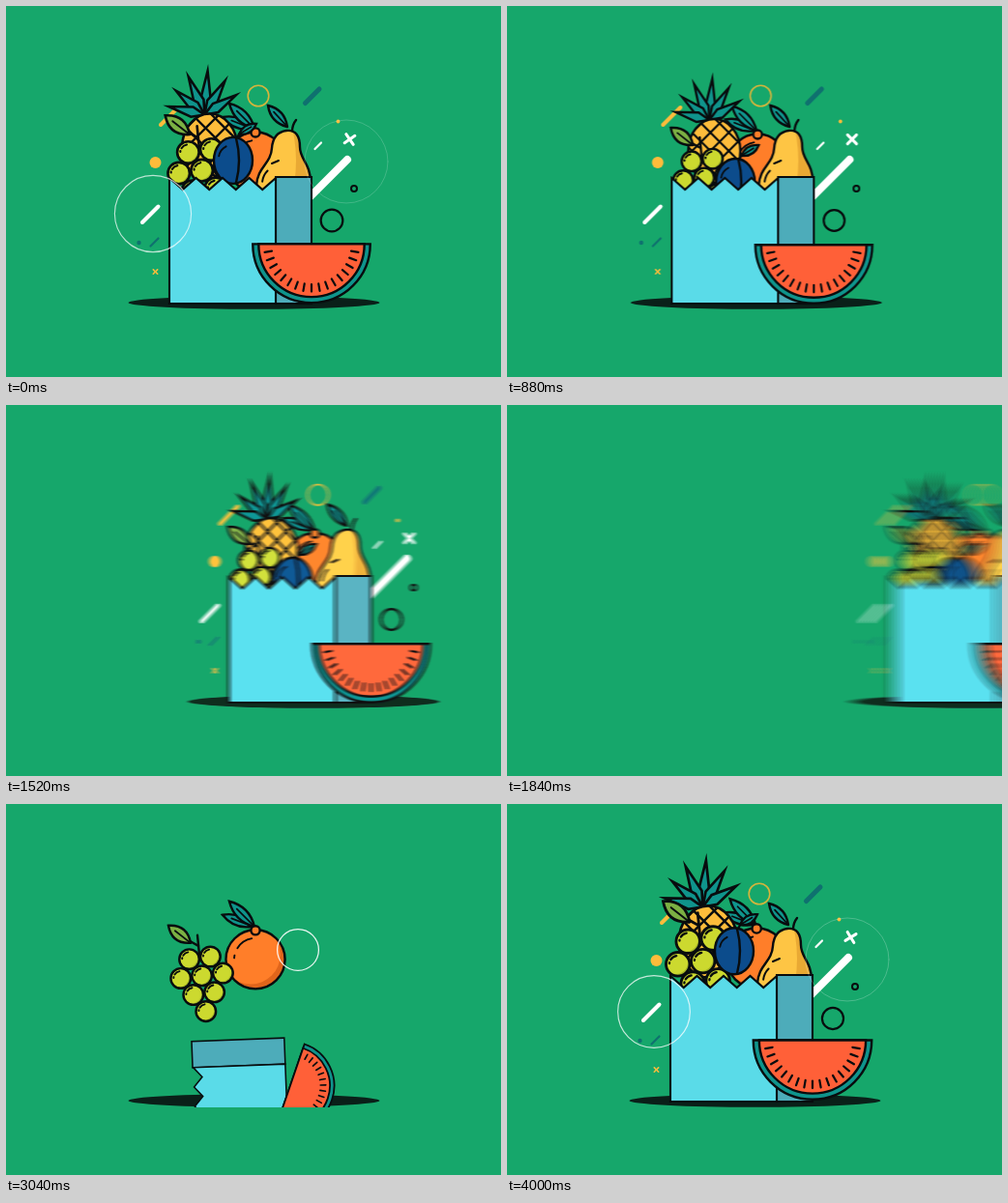
Write an HTML page with a canvas that moves like this. It is 512x384 px and loops after 4.04 s.

```html
<!DOCTYPE html>
<html lang="en">
<head>
<meta charset="utf-8">
<title>Fruit bag</title>
<style>
html, body { margin: 0; width: 100%; height: 100%; overflow: hidden; background: #16a76b; }
canvas { display: block; width: 512px; height: 384px; }
</style>
</head>
<body>
<canvas id="stage" width="512" height="384"></canvas>
<script>
const LOOP = 4040, TAU = Math.PI * 2, RAD = Math.PI / 180;
const BG = '#16a76b', INK = '#080c0e', TEAL = '#0f948c', GOLD = '#fdbc3b', DEEP = '#0f716f', WHITE = '#fff';

function surface(canvas) {
  canvas.width = 512;
  canvas.height = 384;
  return canvas.getContext('2d');
}
const out = surface(document.getElementById('stage'));
const trail = surface(document.createElement('canvas'));
const c = surface(document.createElement('canvas'));

// Timing
const span = (t, start, length) => Math.min(1, Math.max(0, (t - start) / length));
const mix = (a, b, u) => a + (b - a) * u;
const easeOut = u => 1 - (1 - u) ** 3;
const easeBoth = u => u < .5 ? 8 * u ** 4 : 1 - 8 * (1 - u) ** 4;
const backOut = u => 1 + 2.7 * (u - 1) ** 3 + 1.7 * (u - 1) ** 2;
const arrive = (t, start, length) => easeOut(span(t, start, length));
const settle = (t, late) => easeBoth(span(t, 3735 + late, 520));
const swell = (t, start, length, peak, rest = 1, late = 0) =>
  mix(peak * arrive(t, start, length), rest, settle(t, late));
const slide = t => t < 800 ? 0 : 3.65 * (Math.exp(.004 * (t - 800)) - 1);

// Drawing helpers
function place(x, y, deg, s, ox, oy, draw) {
  if (s < .01) return;
  c.save();
  c.translate(x, y);
  c.rotate(deg * RAD);
  c.scale(s, s);
  c.translate(-ox, -oy);
  draw();
  c.restore();
}
const grow = (s, ox, oy, draw) => place(ox, oy, 0, s, ox, oy, draw);

function paint(fill, lw = 2.4, ink = INK) {
  if (fill) { c.fillStyle = fill; c.fill(); }
  if (lw) { c.lineWidth = lw; c.strokeStyle = ink; c.stroke(); }
}
function oval(x, y, rx, ry, fill, lw, ink) {
  c.beginPath();
  c.ellipse(x, y, rx, ry, 0, 0, TAU);
  paint(fill, lw, ink);
}
const disc = (x, y, r, fill, lw, ink) => oval(x, y, r, r, fill, lw, ink);
function poly(points, fill, lw) {
  c.beginPath();
  points.forEach(p => c.lineTo(...p));
  c.closePath();
  paint(fill, lw);
}
function line(x1, y1, x2, y2, lw, ink) {
  c.beginPath();
  c.moveTo(x1, y1);
  c.lineTo(x2, y2);
  paint(null, lw, ink);
}
function bow(x1, y1, mx, my, x2, y2, lw) {
  c.beginPath();
  c.moveTo(x1, y1);
  c.quadraticCurveTo(mx, my, x2, y2);
  paint(null, lw);
}
function arc(x, y, r, from, to, lw) {
  c.beginPath();
  c.arc(x, y, r, from * RAD, to * RAD);
  paint(null, lw);
}
function clipped(shape, draw) {
  c.save();
  shape();
  c.clip();
  draw();
  c.restore();
}
function leaf(x1, y1, x2, y2, w, fill) {
  const mx = (x1 + x2) / 2, my = (y1 + y2) / 2, d = Math.hypot(x2 - x1, y2 - y1);
  const nx = (y1 - y2) / d * w, ny = (x2 - x1) / d * w;
  c.beginPath();
  c.moveTo(x1, y1);
  c.quadraticCurveTo(mx + nx, my + ny, x2, y2);
  c.quadraticCurveTo(mx - nx, my - ny, x1, y1);
  paint(fill);
  line(x1, y1, mix(x1, x2, .7), mix(y1, y2, .7), 1.7);
}
// Round fruit, shaded lower right, with a broken highlight stroke
function ball(x, y, r, fill, shade) {
  clipped(() => disc(x, y, r, shade, 0), () => disc(x - r * .16, y - r * .16, r, fill, 0));
  disc(x, y, r, null);
  arc(x, y, r * .72, 212, 260, 1.9);
  arc(x, y, r * .72, 184, 191, 1.9);
}

// Fruit
function orange() {
  leaf(255, 127, 224, 115, 10, TEAL);
  leaf(257, 127, 231, 101, 11, TEAL);
  ball(258, 161, 30.5, '#ff7e29', '#e0651b');
  disc(258, 131, 4.6, '#ff7e29');
}

function pineapple() {
  for (const i of [3, 2, 4, 1, 5, 0]) {
    const deg = -77 + 27 * i;
    const length = 36 + 7 * Math.cos(deg * RAD) ** 6;
    place(208, 118, deg, 1, 0, 0, () =>
      poly([[0, 0], [-5, -length * .35], [0, -length], [5, -length * .35]], TEAL));
  }
  const body = (fill, lw) => oval(213, 150, 27, 33, fill, lw);
  clipped(() => body(GOLD, 0), () => {
    for (let x = 133; x < 300; x += 19) {
      line(x - 40, 110, x + 40, 190, 2.2);
      line(x + 40, 110, x - 40, 190, 2.2);
    }
  });
  body(null);
}

function grapes() {
  line(198, 136, 200, 156);
  bow(199, 147, 195, 145, 190, 142);
  leaf(191, 144, 168, 126, 13, '#7bb043');
  [2, 3, 2, 1].forEach((count, row) => {
    for (let i = 0; i < count; i++) {
      const k = i - (count - 1) / 2;
      ball(200.5 + 2.1 * row + 21.8 * k, 159.5 + 18.4 * row - 2.7 * k, 10.3, '#ccd92f', '#a3b326');
    }
  });
}

function plum() {
  bow(4, -23, 6, -28, 9, -30);
  leaf(6, -27, 24, -38, 8, TEAL);
  oval(0, 0, 20, 24, '#0c4c8c');
  bow(3, -23, 9, 0, 3, 23);
  arc(-1, -2, 14, 190, 243, 1.9);
}

function pear() {
  bow(296, 130, 296, 123, 300, 118);
  leaf(291, 125, 271, 103, 10, TEAL);
  const body = (fill, lw) => {
    c.beginPath();
    c.moveTo(290, 129);
    c.bezierCurveTo(300, 128, 304, 135, 304, 146);
    c.bezierCurveTo(304, 159, 315, 163, 315, 182);
    c.bezierCurveTo(313, 203, 262, 203, 259, 186);
    c.bezierCurveTo(260, 166, 274, 164, 275, 147);
    c.bezierCurveTo(276, 135, 282, 130, 290, 129);
    paint(fill, lw);
  };
  clipped(() => body('#e9a934', 0), () => oval(276, 160, 24, 60, '#fec544', 0));
  body(null);
  line(275, 163, 282, 160, 2);
  arc(284, 184, 19, 187, 225, 2);
}

function bag() {
  poly([[279, 177], [316, 177], [316, 308], [279, 308]], '#4dacba', 2.1);
  const rim = Array.from({ length: 9 }, (_, i) => [169 + i * 13.75, i % 2 ? 190 : 178]);
  poly([...rim, [279, 308], [169, 308]], '#5adbe8', 2.1);
}

function melon() {
  const half = (r, fill) => {
    c.beginPath();
    c.arc(0, 0, r, 0, Math.PI);
    c.closePath();
    paint(fill);
  };
  half(60.5, TEAL);
  half(54.5, '#ff6038');
  for (let deg = 10; deg <= 170; deg += 10) {
    const x = Math.cos(deg * RAD), y = Math.sin(deg * RAD);
    line(x * 41.5, y * 41.5, x * 49, y * 49, 2.2);
  }
}

// Confetti: diagonal dashes grow down and left from their upper end
function dash(t, start, x, y, length, lw, ink) {
  const d = length * arrive(t, start, 420);
  if (d) line(x, y, x - d, y + d, lw, ink);
}
function dot(t, start, x, y, r, fill, lw, ink) {
  disc(x, y, r * arrive(t, start, 320), fill, lw, ink);
}
function cross(t, start, x, y, size, lw, ink, turn) {
  const u = arrive(t, start, 350);
  place(x, y, turn * (1 - arrive(t, start, 900)), u, 0, 0, () => {
    line(-size, -size, size, size, lw, ink);
    line(size, -size, -size, size, lw, ink);
  });
}

function confetti(t) {
  if (t > 3430) dot(t, 3430, 261, 93, 10.8, null, 1.6, '#d5b53c');
  dot(t, 3320, 343.5, 119.5, 1.9, GOLD, 0);
  dot(t, 3340, 154.5, 162, 6, GOLD, 0);
  dot(t, 3280, 137.5, 245, 2.2, DEEP, 0);
  dash(t, 3560, 324, 86, 14.5, 5, DEEP);
  dash(t, 3490, 326, 141.5, 6.5, 2.2, WHITE);
  dash(t, 3515, 353, 159, 41, 8, WHITE);
  dash(t, 3560, 178, 105, 18, 4, GOLD);
  dash(t, 3200, 157.5, 207.5, 16.5, 4, WHITE);
  dash(t, 3240, 157.5, 240.5, 8, 2.2, DEEP);
  cross(t, 3260, 154.5, 275, 2.2, 1.6, GOLD, 0);
  cross(t, 3540, 355.5, 138, 4.6, 3, WHITE, 120);
  const u = arrive(t, 3490, 420);
  if (u) disc(376 - 16 * u, 174 + 15 * u, 3 * u, null, 2 * Math.sqrt(u));
  const hoop = backOut(span(t, 3560, 1120));
  if (hoop > 0) disc(337, 222, 10.8 * hoop, null, 2.2);
}

function ripple(t, start, x, y) {
  const u = span(t, start, 700);
  if (u === 0 || u === 1) return;
  c.globalAlpha = 1 - .85 * u;
  disc(x, y, 43 * (1 - (1 - u) ** 6), null, 1.3 - .5 * u, WHITE);
  c.globalAlpha = 1;
}

function scene(t) {
  c.clearRect(0, 0, 512, 384);
  c.lineCap = 'round';
  const w = arrive(t, 2050, 730);
  oval(256.5, 307, 130 * w, 6.8 * w, '#0a2019', 0);
  confetti(t);

  // Everything rises from behind the ground line
  c.save();
  c.beginPath();
  c.rect(0, 0, 512, 314);
  c.clip();
  grow(swell(t, 2560, 800, 1.07, .98), 250, 230, orange);
  grow(swell(t, 3080, 600, 1.38, 1, -20), 252, 210, pineapple);
  grow(swell(t, 2664, 1127, 1.42), 202, 258, grapes);
  const lift = arrive(t, 3200, 700);
  place(235, mix(mix(250, 145, lift), 182, settle(t, 60)), 0, Math.min(1, lift * 1.2), 0, 0, plum);
  grow(arrive(t, 3360, 400), 287, 190, pear);

  const sunk = 85 * (1 - arrive(t, 2640, 400));
  const b = easeBoth(span(t, 2578, 1228));
  place(mix(299, 242.5, b), 308 + sunk - 25 * Math.sin(Math.PI * b),
    mix(-110, 0, b), mix(.68, 1, b), 242.5, 308, bag);
  const m = easeBoth(span(t, 2490, 1480)), land = settle(t, -90);
  place(mix(290, 316, m), mix(mix(306, 212, m) + sunk, 247.3, land),
    mix(-84, 0, m), mix(mix(.68, 1.15, m), 1, land), 0, 0, melon);
  c.restore();

  ripple(t, 2965, 302, 151);
  ripple(t, 3400, 352, 161);
  ripple(t, 3800, 152, 215);
}

function render(t) {
  const leaving = t < 2000;
  scene(leaving ? t + LOOP : t);
  const x = leaving ? slide(t) : 0;
  const blur = leaving ? slide(t + 12) - slide(t - 12) : 0;
  const copies = blur > .8 ? 15 : 1;

  // Shutter blur: evenly weighted copies added together
  trail.clearRect(0, 0, 512, 384);
  trail.globalCompositeOperation = 'lighter';
  trail.globalAlpha = 1 / copies;
  for (let i = 0; i < copies; i++) {
    trail.drawImage(c.canvas, x + ((i + .5) / copies - .5) * blur, 0);
  }
  out.fillStyle = BG;
  out.fillRect(0, 0, 512, 384);
  out.drawImage(trail.canvas, 0, 0);
}

const begin = performance.now();
function tick() {
  render((performance.now() - begin) % LOOP);
  requestAnimationFrame(tick);
}
render(0);
requestAnimationFrame(tick);
</script>
</body>
</html>
```
